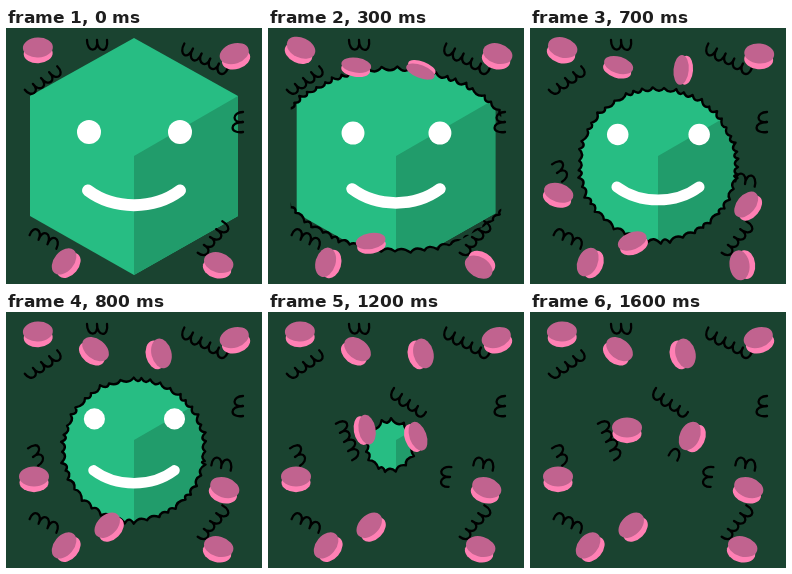
An HTML page with a canvas that plays this animation: 256x256 px, repeating every 3 s.

```html
<!DOCTYPE html>
<html lang="en">
<head>
<meta charset="utf-8">
<title>Nibbled hexagon</title>
<style>
html, body { margin: 0; width: 100%; height: 100%; overflow: hidden; background: #1a4330; }
canvas { display: block; width: 100vw; height: 100vh; }
</style>
</head>
<body>
<canvas id="stage"></canvas>
<script>
const canvas = document.getElementById('stage');
const ctx = canvas.getContext('2d');
const ratio = Math.max(1, window.devicePixelRatio || 1);
canvas.width = canvas.height = 256 * ratio;

const LOOP = 3000, STEP = 100, LAST = 16, GONE = 14, MID = 128;
const BACK = '#1a4330', GREEN = '#27bd83', SHADE = '#219c6b';
const PINK = '#ff80b4', ROSE = '#c1638f';

const lerp = (a, b, p) => a + (b - a) * p;
const rad = deg => deg * Math.PI / 180;

// Repeatable noise from 0 to 1
function noise(n) {
  const v = Math.sin(n * 127.1 + 11.7) * 43758.5453;
  return v - Math.floor(v);
}

// What is left at step k: an ellipse that is eaten from all sides
const meals = [
  { k: 0, x: 128, y: 128, w: 140, h: 128, tilt: 0 },
  { k: 3, x: 128, y: 132, w: 126, h: 91, tilt: 0.05 },
  { k: 5, x: 128, y: 134, w: 94, h: 86, tilt: 0.1 },
  { k: 8, x: 128, y: 138, w: 71, h: 71, tilt: 0.2 },
  { k: 10, x: 127, y: 138, w: 56, h: 49, tilt: 0.4 },
  { k: 12, x: 122, y: 134, w: 24, h: 25, tilt: 0.4 },
  { k: GONE, x: 120, y: 132, w: 0, h: 0, tilt: 0.4 }
];

function restAt(k) {
  const i = meals.findIndex(m => m.k > k);
  const a = meals[i - 1], b = meals[i], p = (k - a.k) / (b.k - a.k);
  const mix = name => lerp(a[name], b[name], p);
  return { x: mix('x'), y: mix('y'), w: mix('w'), h: mix('h'), tilt: mix('tilt') };
}

// Concave bites of uneven length with sharp cusps between them
function bitePath(k) {
  const { x, y, w, h, tilt } = restAt(k);
  const path = new Path2D();
  const at = (a, d) => {
    const px = (w + d) * Math.cos(a), py = (h + d) * Math.sin(a);
    const c = Math.cos(tilt), s = Math.sin(tilt);
    return [x + px * c - py * s, y + px * s + py * c];
  };
  const step = 20 / (w + h);
  path.moveTo(...at(0, 2));
  for (let a = 0, i = 0; a < Math.PI * 2; i++) {
    const next = Math.min(Math.PI * 2, a + step * (0.65 + 0.7 * noise(i)));
    const cusp = next < Math.PI * 2 ? 3 * noise(i + 40) : 2;
    path.quadraticCurveTo(...at(lerp(a, next, 0.6), -5), ...at(next, cusp));
    a = next;
  }
  path.closePath();
  return path;
}

function polygon(points) {
  const path = new Path2D();
  points.forEach(([x, y]) => path.lineTo(x, y));
  path.closePath();
  return path;
}

const hexagon = polygon([[128, 10], [232, 68], [232, 188], [128, 247], [24, 188], [24, 68]]);
const facet = polygon([[128, 128], [232, 68], [232, 188], [128, 247]]);

function zoom(s) {
  ctx.translate(MID, MID);
  ctx.scale(s, s);
  ctx.translate(-MID, -MID);
}

function fill(path, color) {
  ctx.fillStyle = color;
  ctx.fill(path);
}

function oval(x, y, rx, ry, color) {
  ctx.fillStyle = color;
  ctx.beginPath();
  ctx.ellipse(x, y, rx, ry, 0, 0, Math.PI * 2);
  ctx.fill();
}

function drawBody(k, s) {
  if (k >= GONE) return;
  const edge = bitePath(k);
  ctx.save();
  if (k > 0) ctx.clip(edge);
  zoom(s);
  fill(hexagon, GREEN);
  fill(facet, SHADE);
  ctx.restore();
  if (k === 0) return;

  ctx.save();
  zoom(s * 1.06);
  ctx.clip(hexagon);
  zoom(1 / (s * 1.06));
  ctx.strokeStyle = '#000';
  ctx.lineWidth = 2.4;
  ctx.stroke(edge);
  ctx.restore();
}

function drawFace(k, s) {
  if (k > 10) return;
  ctx.save();
  zoom(s);
  oval(83, 104, 12, 12, '#fff');
  if (k < 9) oval(174, 104, 12, 12, '#fff');
  ctx.strokeStyle = '#fff';
  ctx.lineWidth = 12;
  ctx.beginPath();
  ctx.moveTo(82, 162.5);
  ctx.bezierCurveTo(108, 182, 148, 182, 174, 162.5);
  ctx.stroke();
  ctx.restore();
}

// A row of loops centred on x, y, bulging to the right of its heading
const mark = (from, x, y, deg, loops) => ({ from, x, y, deg, loops });
const marks = [
  mark(0, 91, 12, 0, 2),
  mark(0, 35, 50, -36, 4),
  mark(0, 200, 28, 30, 5),
  mark(0, 237, 94, 90, 2),
  mark(6, 27, 145, -120, 2),
  mark(0, 37, 214, 207, 3),
  mark(7, 215, 156, 195, 2),
  mark(0, 204, 209, -52, 4),
  mark(12, 142, 88, 37, 4),
  mark(12, 76, 130, -114, 4),
  mark(13, 143, 146, 211, 1),
  mark(12, 182, 165, 98, 2)
];

function drawMark({ from, x, y, deg, loops }, k) {
  if (k < from) return;
  const pitch = 10;
  ctx.save();
  ctx.translate(x, y);
  ctx.rotate(rad(deg));
  ctx.translate(-loops * pitch / 2, 0);
  ctx.strokeStyle = '#000';
  ctx.lineWidth = 2.3;
  ctx.beginPath();
  ctx.moveTo(0, 0);
  for (let i = 0; i < loops; i++) {
    const left = i * pitch, right = left + pitch;
    const depth = 10 + 4 * noise(i + x);
    ctx.bezierCurveTo(left, depth, right + 2, depth, right, 0);
  }
  ctx.stroke();
  ctx.restore();
}

// While eating, a bug turns, flattens by press and leans in by pull
const bug = (from, x, y, deg, turn, press = 0, pull = 0) => ({ from, x, y, deg, turn, press, pull });
const bugs = [
  bug(0, 32, 22, -3, 28),
  bug(0, 229, 28, -18, 34),
  bug(2, 88, 39, 38, -30, 0.25),
  bug(2, 153, 42, 76, -236, 0.35),
  bug(4, 28, 167, 0, 25, 0.1),
  bug(4, 218, 178, 18, -100, 0.1),
  bug(0, 60, 235, -50, -24),
  bug(0, 212, 237, 16, -165),
  bug(2, 103, 215, -45, 35, 0.2),
  bug(11, 97, 118, 0, 80, 0.15),
  bug(11, 162, 125, -65, 135, 0.15, 14)
];

function drawBug({ from, x, y, deg, turn, press, pull }, k) {
  if (k < from) return;
  const peak = from > 8 ? 12 : 4;
  const bite = Math.max(0, 1 - ((k - peak) / 4) ** 4);
  ctx.save();
  ctx.translate(x + Math.sign(MID - x) * pull * bite, y);
  ctx.rotate(rad(deg + turn * bite));
  ctx.scale(1, 1 - press * bite);
  oval(0, 3.5, 14.5, 9.7, PINK);
  oval(0, -2.5, 15, 10, ROSE);
  ctx.restore();
}

function draw(now) {
  const k = Math.min(LAST, Math.floor((now % LOOP) / STEP));
  const size = 1 - 0.015 * Math.min(k, 10);
  ctx.setTransform(ratio, 0, 0, ratio, 0, 0);
  ctx.lineCap = ctx.lineJoin = 'round';
  ctx.fillStyle = BACK;
  ctx.fillRect(0, 0, 256, 256);
  drawBody(k, size);
  drawFace(k, size);
  marks.forEach(m => drawMark(m, k));
  bugs.forEach(b => drawBug(b, k));
}

const start = performance.now();
function tick() {
  draw(performance.now() - start);
  requestAnimationFrame(tick);
}
tick();
</script>
</body>
</html>
```
